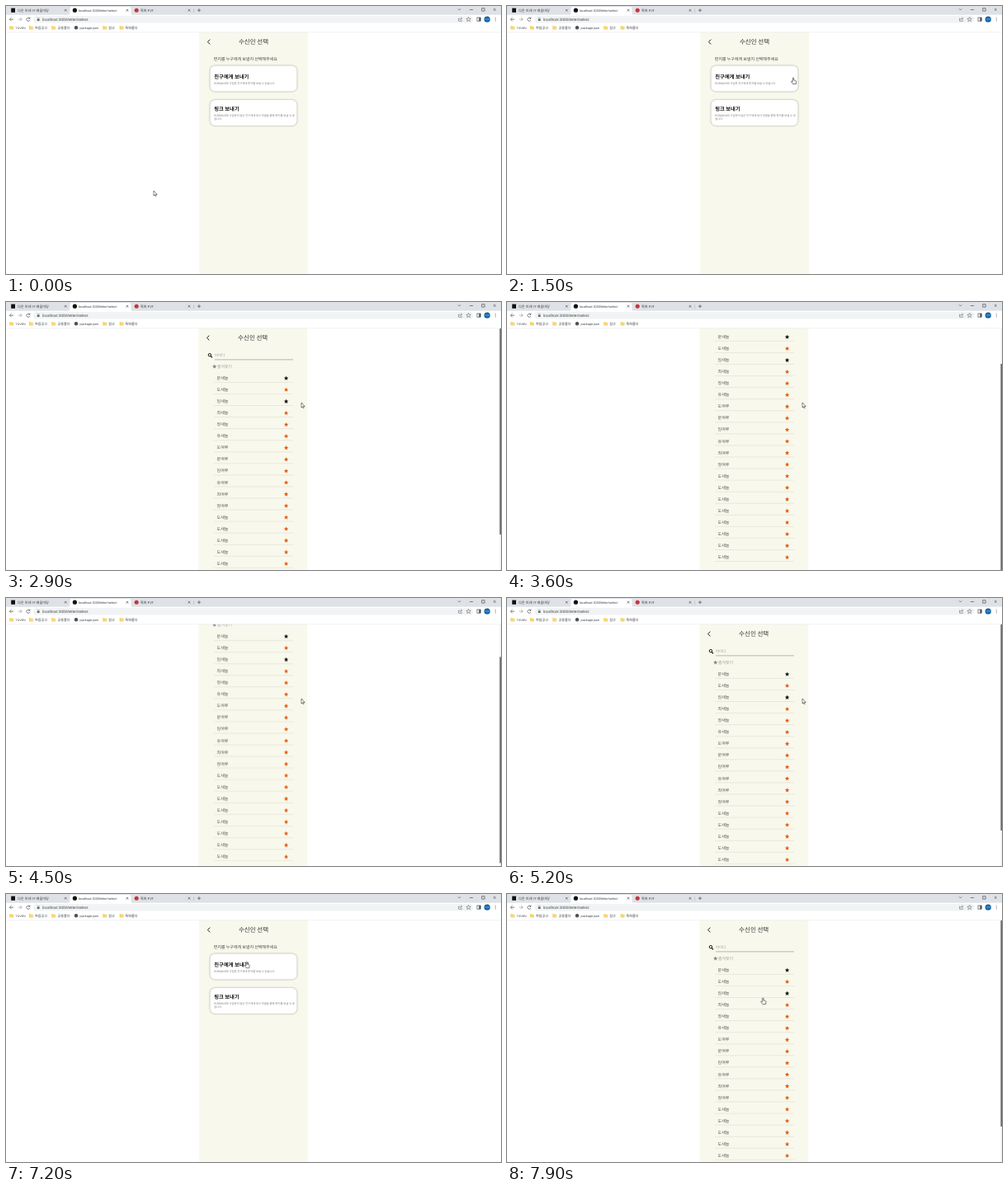
Write an HTML page that moves like this. It is 600 px wide and 325 px high and loops after 8000 ms.

```html
<!DOCTYPE html>
<html>
<head>
<meta charset="utf-8">
<title>수신인 선택</title>
<style>
html, body { margin: 0; width: 100%; height: 100%; overflow: hidden; background: #fff; }
svg { display: block; width: 600px; height: 325px; }
text { font-family: "Noto Sans CJK KR", "Noto Sans CJK", sans-serif; text-rendering: geometricPrecision; fill: #333; }
.ui text { font-family: "Liberation Sans", "Noto Sans CJK KR", sans-serif; fill: #3c4043; }
.line { fill: none; stroke: #4d5156; stroke-width: .7; }
.title { font-size: 7.5px; text-anchor: middle; }
.lead { font-size: 5px; fill: #444; }
.head { font-size: 6.3px; font-weight: 700; fill: #111; }
.note { font-size: 3.3px; fill: #777; }
.name { font-size: 5px; fill: #555; }
.card { fill: #fff; filter: drop-shadow(0 .9px .9px rgba(0,0,0,.38)); }
.back { fill: none; stroke: #222; stroke-width: 1; }

.a { animation: 8s linear infinite; }
.select { animation-name: select; animation-timing-function: step-end; }
.list { animation-name: list; animation-timing-function: step-end; }
.scroll { animation-name: scroll; animation-timing-function: ease-in-out; }
.thumb { animation-name: thumb; animation-timing-function: ease-in-out; }
.hover { animation-name: hover; animation-timing-function: step-end; }
.cursor { animation-name: cursor; }
.arrow { animation-name: arrow; animation-timing-function: step-end; }
.hand { animation-name: hand; animation-timing-function: step-end; }

@keyframes select { 0%, 83.75% { opacity: 1 } 21.25%, 95%, 100% { opacity: 0 } }
@keyframes list { 0%, 83.75% { opacity: 0 } 21.25%, 95%, 100% { opacity: 1 } }
@keyframes hover { 0%, 83.75%, 100% { opacity: 0 } 78.75% { opacity: 1 } }
@keyframes scroll {
  0%, 26.25%, 36.25%, 61.25%, 100% { transform: translateY(0) }
  31.25%, 32.5%, 42.5%, 55% { transform: translateY(-50px) }
}
@keyframes thumb {
  0%, 26.25%, 36.25%, 61.25%, 100% { transform: translateY(0) }
  31.25%, 32.5%, 42.5%, 55% { transform: translateY(43px) }
}
@keyframes cursor {
  0%, 1% { transform: translate(179px, 224px) }
  3.75% { transform: translate(208px, 240px) }
  5% { transform: translate(265px, 226px) }
  6.25% { transform: translate(335px, 180px) }
  7.5% { transform: translate(378px, 132px) }
  8.75% { transform: translate(388px, 104px) }
  10% { transform: translate(366px, 92px) }
  11.25%, 22.5% { transform: translate(347px, 87px) }
  23.75% { transform: translate(363px, 114px) }
  25%, 69% { transform: translate(358px, 122px) }
  72.5% { transform: translate(335px, 106px) }
  76.25% { transform: translate(276px, 66px) }
  80%, 84% { transform: translate(245px, 41px) }
  87.5% { transform: translate(266px, 62px) }
  91.25%, 95% { transform: translate(304px, 92px) }
  98.75%, 100% { transform: translate(310.3px, 126px) }
}
@keyframes arrow {
  0%, 23.75%, 75%, 83.75% { opacity: 1 }
  11.25%, 71.25%, 78.75%, 88.75%, 100% { opacity: 0 }
}
@keyframes hand {
  0%, 23.75%, 75%, 83.75% { opacity: 0 }
  11.25%, 71.25%, 78.75%, 88.75%, 100% { opacity: 1 }
}
</style>
</head>
<body>
<svg viewBox="0 0 600 325">
  <defs>
    <path id="star" d="M0-2.7.8-.9 2.7-.8 1.2.5 1.7 2.4 0 1.4-1.7 2.4-1.2.5-2.7-.8-.8-.9Z"/>
    <path id="folder" d="M-2.2-1.9h1.7l.6.7h2.2v3.2h-4.5z" fill="#f8d775" stroke="#e9bf4f" stroke-width=".3"/>
    <path id="close" class="line" d="M-1.3-1.3 1.3 1.3M1.3-1.3-1.3 1.3"/>
  </defs>

  <g class="a select">
    <rect x="234.3" y="32" width="131.7" height="293" fill="#f8f8ec"/>
    <path class="back" d="M247.2 40.6 244.4 43.5 247.2 46.4"/>
    <text class="title" x="300" y="46.2">수신인 선택</text>
    <text class="lead" x="251.8" y="65.6">편지를 누구에게 보낼지 선택해주세요</text>
    <rect class="card" x="247.5" y="72.5" width="105" height="31" rx="6"/>
    <text class="head" x="252.3" y="88.2">친구에게 보내기</text>
    <text class="note" x="252.3" y="94.6">BORANDI에 가입한 친구에게 편지를 보낼 수 있습니다.</text>
    <rect class="card" x="247.5" y="114" width="105" height="31" rx="6"/>
    <text class="head" x="252.3" y="127.4">링크 보내기</text>
    <text class="note" x="252.3" y="133.6">BORANDI에 가입하지 않은 친구에게 링크 연결을 통해 편지를 보낼 수 있</text>
    <text class="note" x="252.3" y="138.4">습니다.</text>
  </g>

  <g class="a list">
    <g class="a scroll">
      <rect x="233.5" y="32" width="131.7" height="343" fill="#f8f8ec"/>
      <circle class="a hover" cx="245.2" cy="43.5" r="6.6" fill="#000" fill-opacity=".06"/>
      <path class="back" d="M246.4 40.6 243.6 43.5 246.4 46.4"/>
      <text class="title" x="299.2" y="46.2">수신인 선택</text>
      <g fill="none" stroke="#111">
        <circle cx="246.9" cy="64.2" r="1.7"/>
        <path d="M248.2 65.5 250 67.3" stroke-width="1.2"/>
      </g>
      <text x="253" y="65.7" font-size="4.4" style="fill:#999">아이디</text>
      <path d="M253 69.9H348" stroke="#8b8b85" stroke-width=".6"/>
      <use href="#star" x="252.7" y="78.2" fill="#888"/>
      <text x="256" y="79.8" font-size="4.9" style="fill:#a2a29c">즐겨찾기</text>
      <g id="rows"></g>
    </g>
    <rect x="598.3" y="32" width="1.7" height="293" fill="#f4f4f4"/>
    <rect class="a thumb" x="598.4" y="32" width="1.6" height="250" fill="#686868"/>
  </g>

  <g class="ui">
    <rect width="600" height="11" fill="#dee1e6"/>
    <rect y="10.7" width="600" height="21.1" fill="#fff"/>
    <path d="M0 31.8H600" stroke="#e3e5e8" stroke-width=".5"/>
    <path d="M75.5 11Q77.5 11 77.5 9V3Q77.5 1 79.5 1H149.5Q151.5 1 151.5 3V9Q151.5 11 153.5 11Z" fill="#fff"/>
    <path d="M227.5 3V8" stroke="#9a9da2" stroke-width=".4"/>

    <rect x="6.2" y="2.6" width="4.8" height="5.2" fill="#111"/>
    <text x="14" y="6.6" font-size="4.2">다온 미래 IT 배움마당</text>
    <circle cx="83.4" cy="5.2" r="2.6" fill="#111"/>
    <text x="88" y="6.6" font-size="3.9">localhost:3000/letter/select</text>
    <circle cx="158.2" cy="5.2" r="2.5" fill="#c8323c"/>
    <text x="163" y="6.6" font-size="4.1">특화 PJT</text>
    <use href="#close" x="72.3" y="5.2"/>
    <use href="#close" x="147" y="5.2"/>
    <use href="#close" x="222" y="5.2"/>
    <path class="line" d="M232 5.2h4M234 3.2v4M548 3.4l1.6 1.6 1.6-1.6M562 4.5h4M576.7 2.7h3.4v3.4h-3.4z"/>
    <use href="#close" x="592.3" y="4.4" transform="translate(0 0)"/>

    <path class="line" d="M9 16.2H4.4M6.6 14 4.4 16.2 6.6 18.4"/>
    <path class="line" d="M14.6 16.2h4.6M17 14l2.2 2.2-2.2 2.2" opacity=".55"/>
    <path class="line" d="M28.6 14.8A2.1 2.1 0 1 0 29 17M29 13.6V15.3H27.2"/>
    <rect x="33" y="12" width="533" height="8.4" rx="4.2" fill="#f1f3f4"/>
    <rect x="37.8" y="15.8" width="2.8" height="2.3" rx=".3" fill="#5f6368"/>
    <path class="line" d="M38.4 16v-.8a.8.8 0 0 1 1.6 0v.8" style="stroke-width:.4"/>
    <text x="44" y="17.9" font-size="4.69">localhost:3000/letter/select</text>
    <path class="line" d="M549.6 15h-1v3.3h4v-1.2M550 17q.2-2 2.6-2M551.4 13.8l1.4 1.2-1.4 1.2" style="stroke-width:.5"/>
    <use href="#star" x="560.6" y="16.2" fill="none" stroke="#4d5156" stroke-width=".5"/>
    <rect class="line" x="571" y="14" width="4.2" height="4.2"/>
    <rect x="573.3" y="14" width="1.9" height="4.2" fill="#4d5156"/>
    <circle cx="583.2" cy="16.2" r="3.6" fill="#1565a9"/>
    <text x="583.2" y="17.1" font-size="2.6" text-anchor="middle" style="fill:#dcebf7">나무</text>
    <g fill="#4d5156">
      <circle cx="593.2" cy="14.5" r=".5"/><circle cx="593.2" cy="16.3" r=".5"/><circle cx="593.2" cy="18.1" r=".5"/>
    </g>

    <use href="#folder" x="6.7" y="26.2"/>
    <text x="11.6" y="27.7" font-size="3.5">TOVEN</text>
    <use href="#folder" x="30.2" y="26.2"/>
    <text x="35" y="27.8" font-size="4.1">취업공고</text>
    <use href="#folder" x="57.6" y="26.2"/>
    <text x="62.4" y="27.8" font-size="4.1">공용폴더</text>
    <circle cx="85" cy="26.2" r="2.2" fill="#4d5156"/>
    <text x="89.6" y="27.6" font-size="3.82">package.json</text>
    <use href="#folder" x="119.6" y="26.2"/>
    <text x="124.2" y="27.8" font-size="4.1">참고</text>
    <use href="#folder" x="140" y="26.2"/>
    <text x="144.5" y="27.8" font-size="4.1">특화폴더</text>
  </g>

  <g class="a cursor">
    <path class="a arrow" d="M0 0V6.1L1.4 4.8 2.3 6.8 3.2 6.4 2.3 4.5H4.2Z" fill="#fff" stroke="#222" stroke-width=".55"/>
    <path class="a hand" d="M-.7.4Q0-.5.7.4V3l2.1.5q1 .3.9 1.4L3.3 7.6H-.4L-2.4 4.8q-.2-.8.6-.8L-.7 4.8Z" fill="#fff" stroke="#222" stroke-width=".6"/>
  </g>
</svg>
<script>
const names = [
  ..."문도임최정유".split("").map(s => s + "새늘"),
  ..."도문임유최정".split("").map(s => s + "여루"),
  ...Array(8).fill("도새늘")
];
const unstarred = [0, 2];
document.getElementById("rows").innerHTML = names.map((name, i) => {
  const y = 92.2 + i * 14.06;
  const color = unstarred.includes(i) ? "#111" : "#e35d12";
  return `<text class="name" x="255.6" y="${y + 1.8}">${name}</text>
    <use href="#star" x="339.6" y="${y + .2}" fill="${color}"/>
    <path d="M252 ${y + 5.2}H348" stroke="#d9d9d0" stroke-width=".5"/>`;
}).join("");
</script>
</body>
</html>
```
